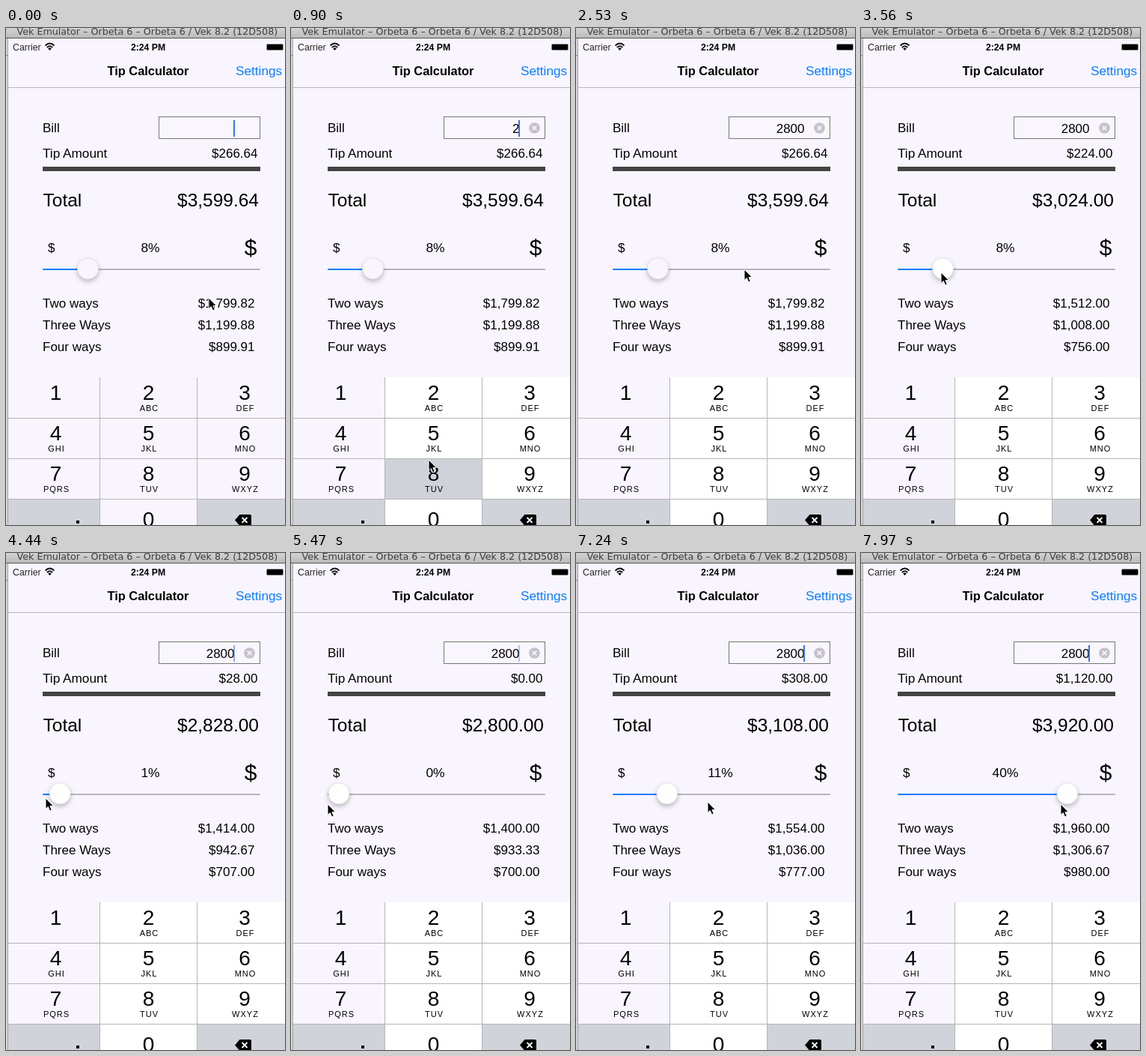
Write an HTML page that moves like this. It is 373 px wide and 663 px high and loops after 8000 ms.

```html
<!DOCTYPE html>
<html lang="en">
<head>
<meta charset="utf-8">
<title>Tip Calculator</title>
<style>
  html, body { margin: 0; width: 100%; height: 100%; overflow: hidden; background: #f9f5fe; }
  svg { display: block; width: 373px; height: 663px; font: 17px "Liberation Sans", Arial, sans-serif; }
  .end { text-anchor: end; }
  .mid { text-anchor: middle; }
  .big { font-size: 24.5px; }
  .digit { font-size: 28px; text-anchor: middle; }
  .letters { font-size: 11px; letter-spacing: 1px; text-anchor: middle; }
  #thumb { filter: drop-shadow(0 3px 3px rgba(0, 0, 0, .25)); }
</style>
</head>
<body>
<svg viewBox="0 0 373 663">
  <defs>
    <linearGradient id="bar" x2="0" y2="1">
      <stop stop-color="#d2d2d2"/><stop offset="1" stop-color="#b9b9b9"/>
    </linearGradient>
  </defs>
  <rect width="373" height="663" fill="#f9f5fe"/>

  <!-- window frame -->
  <rect width="373" height="14" fill="url(#bar)"/>
  <path d="M0 13.5H373" stroke="#555"/>
  <rect y="14" width="3" height="649" fill="#d6d4d8"/>
  <path d="M2.5 14V663" stroke="#a5a3a8"/>
  <path d="M0 36.5H2" stroke="#888"/>
  <text x="14.5" y="9" fill="#3c3c3c" style="font:12.7px 'DejaVu Sans',sans-serif">Vek Emulator – Orbeta 6 – Orbeta 6 / Vek 8.2 (12D508)</text>

  <!-- status and navigation bars -->
  <text x="9" y="30" font-size="12.3" fill="#222">Carrier</text>
  <g fill="none" stroke="#111" stroke-width="1.8">
    <path d="M52.5 23.5Q58.5 17.5 64.5 23.5M54.8 26Q58.5 22.3 62.2 26"/>
    <path d="M56.2 27.4Q58.5 25.3 60.8 27.4L58.5 30Z" fill="#111" stroke="none"/>
  </g>
  <text x="190" y="30" font-size="12.2" font-weight="700" class="mid">2:24 PM</text>
  <rect x="348.5" y="21.5" width="22" height="8" rx="1.5" stroke="#8a888e"/>
  <text x="190" y="63" font-size="16.4" font-weight="700" class="mid">Tip Calculator</text>
  <text x="307" y="63" font-size="17.2" fill="#0b7dff">Settings</text>
  <path d="M3 79.5H373" stroke="#b9b5bd"/>

  <!-- bill and totals -->
  <text x="49" y="139">Bill</text>
  <rect x="204.5" y="118.5" width="135" height="29" fill="#f9f6fe" stroke="#777"/>
  <text id="bill" x="305.5" y="140" class="end"></text>
  <rect id="caret" x="304" y="123" width="2" height="22" fill="#3c74dc"/>
  <g id="clear">
    <circle cx="325.5" cy="133.5" r="7.3" fill="#c5c2cb"/>
    <path d="M322.7 130.7l5.6 5.6m0-5.6l-5.6 5.6" stroke="#fff" stroke-width="1.4"/>
  </g>
  <text x="49" y="173" font-size="17.2">Tip Amount</text>
  <text id="tip" x="336.5" y="173" class="end"></text>
  <rect x="49" y="185" width="291" height="6" fill="#444"/>
  <text x="49.5" y="238" class="big">Total</text>
  <text id="total" x="338" y="238" class="end big"></text>

  <!-- tip slider -->
  <text x="56" y="299">$</text>
  <text id="percent" x="193" y="299" class="mid" font-size="17.4"></text>
  <text x="327" y="303" class="mid" font-size="30">$</text>
  <rect x="49" y="321" width="291" height="2" rx="1" fill="#b6b3ba"/>
  <rect id="fill" x="49" y="321" width="0" height="2" rx="1" fill="#0b7dff"/>
  <circle id="thumb" cy="321" r="14" stroke="#ddd9e2" stroke-width=".6"/>

  <text x="49" y="373">Two ways</text>
  <text x="49" y="402">Three Ways</text>
  <text x="49" y="431">Four ways</text>
  <text id="two" x="332.5" y="373" class="end"></text>
  <text id="three" x="332.5" y="402" class="end"></text>
  <text id="four" x="332.5" y="431" class="end"></text>

  <!-- keypad -->
  <rect id="pad" x="126" y="466" width="247" height="197"/>
  <path d="M3 629H125V663H3ZM256 629H373V663H256Z" fill="#d0d3da"/>
  <rect id="pressed" x="126" width="129" height="53" fill="#cfd2d9"/>
  <path d="M3 520.5H373M3 574.5H373M3 628.5H373M125.5 466V663M255.5 466V663" stroke="#b6b5ba"/>
  <g id="keys"></g>
  <rect x="94" y="657" width="4" height="4"/>
  <path d="M306 656.5L312.5 649H326Q328 649 328 651V662Q328 664 326 664H312.5Z"/>
  <path d="M315.5 653l7 7m0-7l-7 7" stroke="#fff" stroke-width="1.8"/>

  <path id="cursor" d="M0 0V14.5L3.3 11.5L5.6 17L8.2 15.9L5.9 10.6H10.4Z" stroke="#fff" stroke-width="1" stroke-linejoin="round"/>
</svg>
<script>
const LOOP = 8000, STEP = 147.5;
const TINT = "#f9f5fe", WHITE = "#fff";
const COMMIT = 2650, DRAG = 3690, LAG = 200, HOLD = 140, BLINK = 1020;
const KNOB_MIN = 64, KNOB_START = 109.5, PX_PER_PERCENT = 5.24;

const $ = id => document.getElementById(id);
const set = (id, attrs) => { for (const k in attrs) $(id).setAttribute(k, attrs[k]); };
const clamp01 = v => Math.max(0, Math.min(1, v));
const ease = u => u * u * (3 - 2 * u);

// Pointer moves: start, end, x, y; it rests in between
const moves = [
  [0, 450, 190, 488], [600, 870, 184, 576],      // keys 2 and 8
  [1350, 1740, 197, 655], [2080, 2510, 225, 322], // key 0, then off the keypad
  [2650, 3540, 107, 326], [DRAG, 4640, 45, 327],  // grab the knob, drag left
  [5180, 6060, 63, 362], [6400, 6480, 62, 329],   // wander, grab again
  [6650, 7750, 274, 334], [7750, 7970, 267, 335]  // drag right
];
function pointer(t) {
  let x = 271, y = 360;
  for (const [from, to, toX, toY] of moves) {
    const u = ease(clamp01((t - from) / (to - from)));
    x += (toX - x) * u;
    y += (toY - y) * u;
  }
  return [x, y];
}

// The knob trails the pointer while dragged
const knob = t => t < DRAG ? KNOB_START : Math.max(KNOB_MIN, pointer(t - LAG)[0] + 2);

const presses = [["2", 580], ["8", 870], ["0", 1620], ["0", 1910]];
const rowTop = row => 467 + 54 * row;
const keyRow = digit => digit === "0" ? 3 : Math.floor((digit - 1) / 3);

function caretAlpha(t) {
  if (t < 2300) return 1;
  const p = (t - 3560 + 2 * BLINK) % BLINK;
  return clamp01(Math.min((p - 270) / 50, (900 - p) / 60));
}

const money = v => "$" + v.toLocaleString("en-US", { minimumFractionDigits: 2, maximumFractionDigits: 2 });

const letters = ["", "ABC", "DEF", "GHI", "JKL", "MNO", "PQRS", "TUV", "WXYZ"];
$("keys").innerHTML = letters.map((word, i) => {
  const x = [66.5, 190.5, 319][i % 3], y = rowTop(Math.floor(i / 3)) + 29;
  return `<text class="digit" x="${x}" y="${y}">${i + 1}</text>` +
    `<text class="letters" x="${x + 1}" y="${y + 15}">${word}</text>`;
}).join("") + '<text class="digit" x="190.5" y="665">0</text>';

function render(t) {
  const typed = presses.filter(([, at]) => t >= at + HOLD).map(([digit]) => digit).join("");
  const down = presses.find(([, at]) => t >= at && t < at + HOLD);
  const [px, py] = pointer(t).map(Math.round);
  const kx = knob(t);
  const percent = Math.floor((kx - KNOB_MIN) / PX_PER_PERCENT);
  const bill = t < COMMIT ? 3333 : 2800;
  const tip = bill * percent / 100, total = bill + tip;
  const labels = {
    bill: typed, percent: percent + "%", tip: money(tip), total: money(total),
    two: money(total / 2), three: money(total / 3), four: money(total / 4)
  };
  for (const id in labels) $(id).textContent = labels[id];
  set("clear", { opacity: typed ? 1 : 0 });
  set("caret", { opacity: caretAlpha(t) });
  set("pad", { fill: t < STEP ? TINT : WHITE });
  set("pressed", { y: down ? rowTop(keyRow(down[0])) : 0, opacity: down ? 1 : 0 });
  set("thumb", { cx: kx, fill: t < COMMIT ? TINT : WHITE });
  set("fill", { width: kx - 49 });
  set("cursor", { transform: `translate(${px} ${py})` });
}

const start = performance.now();
function frame() {
  const t = (performance.now() - start) % LOOP;
  render(Math.floor(t / STEP) * STEP);
  requestAnimationFrame(frame);
}
frame();
</script>
</body>
</html>
```
